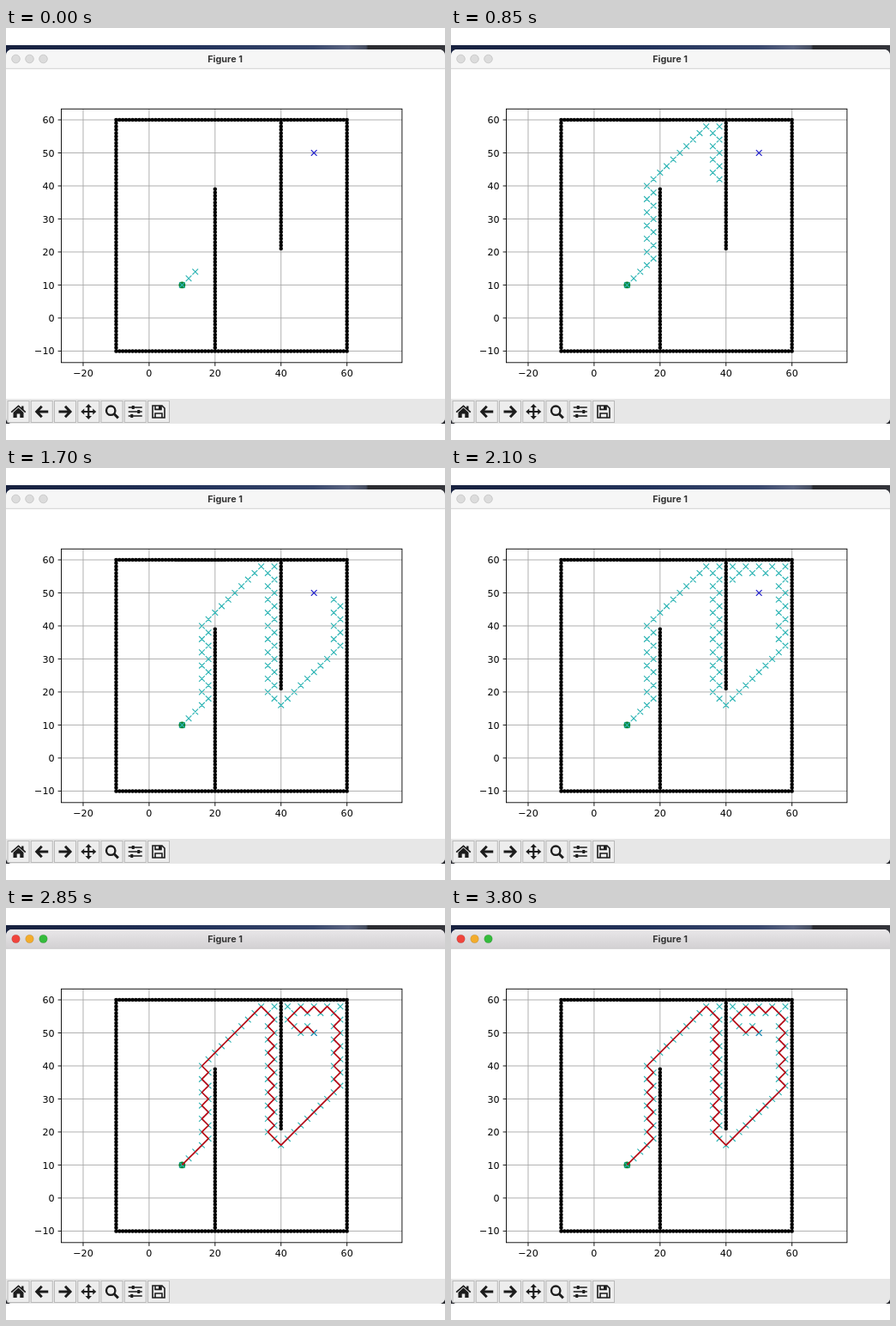
An HTML page that plays this animation: 512 by 480 pixels, repeating every 3850 ms.

```html
<!DOCTYPE html>
<html lang="en">
<head>
<meta charset="utf-8">
<title>Depth-first path search</title>
<style>
html, body { margin: 0; width: 100%; height: 100%; overflow: hidden; background: #fff; }
svg { display: block; }
text { font: 11.14px "DejaVu Sans", sans-serif; fill: #000; }
#title { font: 700 10.8px Inter, sans-serif; fill: #333; text-anchor: middle; }
#bar { fill: #f6f6f6; }
#lights circle { fill: #dcdcdc; stroke: #c3c3c3; stroke-width: .8; }
#route { display: none; }
.active #bar { fill: url(#barFill); }
.active #lights circle { stroke: #0002; }
.active #lights :nth-child(1) { fill: #f0443c; }
.active #lights :nth-child(2) { fill: #f3ac2c; }
.active #lights :nth-child(3) { fill: #35bb3c; }
.active #route { display: inline; }
.line { fill: none; stroke-width: .9; }
.button { fill: #ededed; stroke: #b9b9b9; }
.icon { fill: #1c1c1c; stroke: none; }
.stroke { fill: none; stroke: #1c1c1c; stroke-width: 3; }
</style>
</head>
<body>
<svg id="stage" width="512" height="480" viewBox="0 0 512 480">
  <defs>
    <linearGradient id="barFill" x2="0" y2="1">
      <stop stop-color="#e9e7e9"/><stop offset="1" stop-color="#d2d0d2"/>
    </linearGradient>
    <linearGradient id="desk">
      <stop stop-color="#17213f"/><stop offset=".45" stop-color="#24345c"/>
      <stop offset=".7" stop-color="#38476c"/><stop offset=".78" stop-color="#5a6480"/>
      <stop offset=".82" stop-color="#454c5e"/><stop offset=".825" stop-color="#2a2b30"/>
      <stop offset="1" stop-color="#34353b"/>
    </linearGradient>
    <clipPath id="frame"><rect y="25" width="512" height="436" rx="7"/></clipPath>
  </defs>
  <rect y="20" width="512" height="24" fill="url(#desk)"/>
  <rect y="440" width="512" height="21" fill="#25262c"/>
  <g clip-path="url(#frame)">
    <rect y="25" width="512" height="436" fill="#fff"/>
    <rect id="bar" y="25" width="512" height="22.5"/>
    <path class="line" d="M0 47.3H512" stroke="#cfcfcf"/>
    <rect y="432" width="512" height="29" fill="#e7e7e7"/>
  </g>
  <g id="lights">
    <circle cx="11.5" cy="36" r="4.8"/><circle cx="27.5" cy="36" r="4.8"/><circle cx="43.5" cy="36" r="4.8"/>
  </g>
  <text id="title" x="255.5" y="39.6">Figure 1</text>

  <path id="grid" class="line" stroke="#a8a8a8"/>
  <path id="walls" fill="none" stroke="#000" stroke-width="4.5" stroke-linecap="round"/>
  <circle id="start" r="3.9" fill="#0c8636"/>
  <path id="goal" fill="none" stroke="#1414c8" stroke-width="1.15"/>
  <path id="visited" fill="none" stroke="#2cb4b4" stroke-width="1.15"/>
  <path id="route" fill="none" stroke="#bd0a18" stroke-width="1.7" stroke-linejoin="round"/>
  <rect class="line" x="64.5" y="94.3" width="397.4" height="295.5" stroke="#000"/>
  <path id="ticks" class="line" stroke="#000"/>
  <g id="labels"></g>
  <g id="tools"></g>
</svg>
<script>
const $ = id => document.getElementById(id);
const px = x => +(166.9 + 3.846 * x).toFixed(2);
const py = y => +(337.9 - 3.848 * y).toFixed(2);
const range = (a, b, step = 1) => Array.from({ length: Math.floor((b - a) / step) + 1 }, (_, i) => a + i * step);
const cross = ([x, y]) => {
  const r = 3.35, X = px(x), Y = py(y);
  return `M${X - r} ${Y - r}l${2 * r} ${2 * r}m0 ${-2 * r}l${-2 * r} ${2 * r}`;
};
const label = (x, y, anchor, n) =>
  `<text x="${x}" y="${y}" text-anchor="${anchor}">${n < 0 ? '\u2212' : ''}${Math.abs(n)}</text>`;

// Axes
let grid = '', ticks = '', labels = '';
for (const x of range(-20, 60, 20)) {
  grid += `M${px(x)} 94V390`;
  ticks += `M${px(x)} 390v3.9`;
  labels += label(px(x), 406, 'middle', x);
}
for (const y of range(-10, 60, 10)) {
  grid += `M64 ${py(y)}H462`;
  ticks += `M64.5 ${py(y)}h-3.9`;
  labels += label(56.6, py(y) + 4.1, 'end', y);
}
$('grid').setAttribute('d', grid);
$('ticks').setAttribute('d', ticks);
$('labels').innerHTML = labels;

// Obstacles
const dots = [
  ...range(-10, 60).flatMap(v => [[v, -10], [v, 60], [-10, v], [60, v]]),
  ...range(-10, 39).map(y => [20, y]),
  ...range(21, 60).map(y => [40, y])
];
$('walls').setAttribute('d', dots.map(([x, y]) => `M${px(x)} ${py(y)}h0`).join(''));

// Depth-first search on diagonal moves
const blocked = (x, y) => Math.min(x, y) <= -10 || Math.max(x, y) >= 60 ||
  (x === 20 && y <= 40) || (x === 40 && y >= 20);

function search(start, goal) {
  const moves = [[-2, -2], [2, -2], [-2, 2], [2, 2]];
  const seen = new Set([String(start)]);
  const stack = [{ at: start, from: null }];
  const order = [];
  while (stack.length) {
    const node = stack.pop(), [x, y] = node.at;
    order.push(node.at);
    if (String(node.at) === String(goal)) {
      const route = [];
      for (let n = node; n; n = n.from) route.push(n.at);
      return { order, route };
    }
    for (const [dx, dy] of moves) {
      const at = [x + dx, y + dy];
      if (blocked(...at) || seen.has(String(at))) continue;
      seen.add(String(at));
      stack.push({ at, from: node });
    }
  }
}

const start = [10, 10], goal = [50, 50];
const { order, route } = search(start, goal);
const crosses = order.map(cross);
$('start').setAttribute('cx', px(start[0]));
$('start').setAttribute('cy', py(start[1]));
$('goal').setAttribute('d', cross(goal));
$('route').setAttribute('d', 'M' + route.map(([x, y]) => `${px(x)} ${py(y)}`).join('L'));

// Toolbar, icons centred on 0,0
const arrow = '<path class="stroke" d="M0 -6.2L-6 0L0 6.2M-5 0H7.5"/>';
const head = a => `<path class="icon" transform="rotate(${a})" d="M0 -9L3.6 -5H-3.6Z"/>`;
const icons = [
  '<path class="icon" d="M-6 1L0 -4.4L6 1V7H1.8V2.5H-1.8V7H-6Z"/>' +
  '<path class="stroke" style="stroke-width:1.7" d="M-8.3 .6L0 -6.6L8.3 .6"/><path class="icon" d="M3.6 -6.5H6V-1L3.6 -3Z"/>',
  arrow,
  `<g transform="scale(-1 1)">${arrow}</g>`,
  '<path class="stroke" style="stroke-width:2.2" d="M0 -6V6M-6 0H6"/>' + [0, 90, 180, 270].map(head).join(''),
  '<circle class="stroke" style="stroke-width:2.4" cx="-1.3" cy="-1.3" r="5.2"/><path class="stroke" d="M2.7 2.7L7.4 7.4"/>',
  '<path class="stroke" style="stroke-width:1.6" d="M-8 -5H8M-8 0H8M-8 5H8"/>' +
  '<path class="stroke" d="M-2.5 -7v4M4 -2v4M-4 3v4"/>',
  '<path class="stroke" style="stroke-width:1.6" d="M-7 -7H4L7 -4V7H-7ZM-4 7V2H4V7M-4 -7V-2.6H3V-7"/>' +
  '<path class="icon" d="M0 -7H3V-3H0Z"/>'
];
$('tools').innerHTML = icons.map((icon, i) =>
  `<g transform="translate(${14.5 + 27.25 * i} 447)"><rect class="button" x="-12.5" y="-12.5" width="25" height="25"/>${icon}</g>`
).join('');

// Search slows slightly as the plot fills up
const LOOP = 3850, STEP = 50, DONE = 45;
const t0 = performance.now();
let last = -1;

function draw(now) {
  const k = Math.floor(Math.max(0, now - t0) % LOOP / STEP);
  if (k !== last) {
    last = k;
    const done = k >= DONE;
    const n = done ? order.length : Math.round(2 + 1.882 * k - 0.00346 * k * k) + 1;
    $('visited').setAttribute('d', crosses.slice(0, n).join(''));
    $('stage').classList.toggle('active', done);
  }
  requestAnimationFrame(draw);
}
draw(t0);
</script>
</body>
</html>
```
